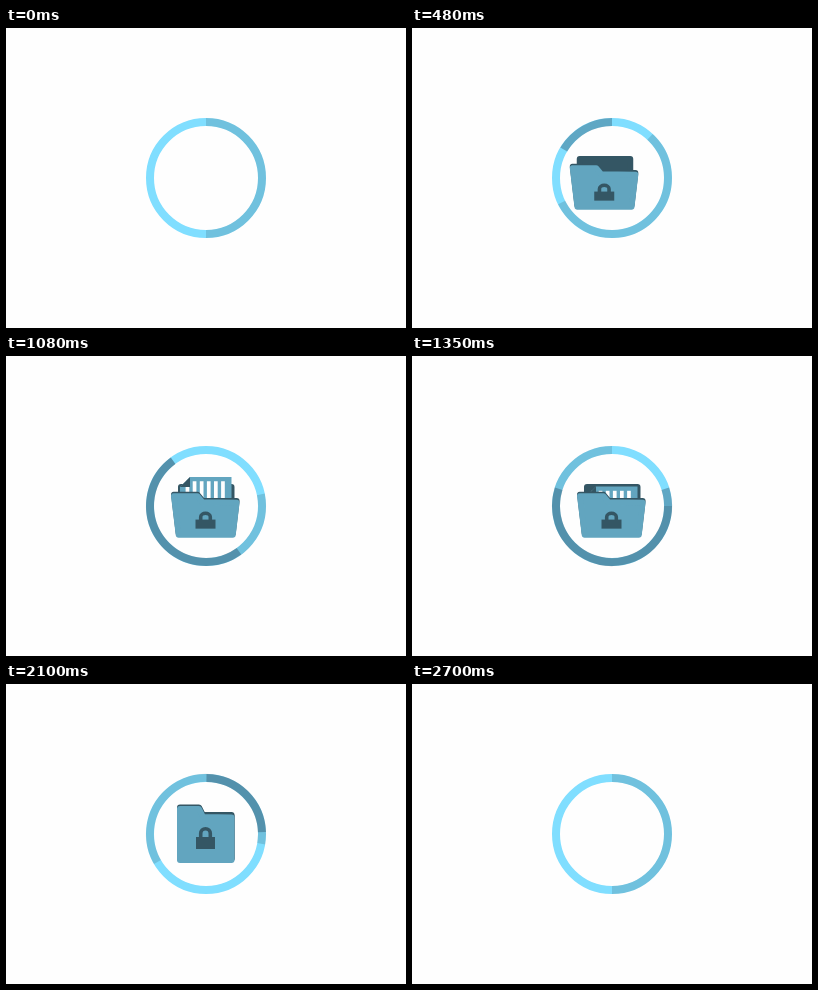
Recreate the animation shown at these times as an HTML page with a canvas. Size 400 by 300 pixels, loop 2730 ms.

```html
<!DOCTYPE html>
<html lang="en">
<head>
<meta charset="utf-8">
<title>Locked folder loader</title>
<style>
  html, body { margin: 0; width: 100%; height: 100%; overflow: hidden; background: #fefefe; }
  canvas { display: block; width: 400px; height: 300px; }
</style>
</head>
<body>
<canvas id="stage" width="400" height="300"></canvas>
<script>
const ctx = document.getElementById('stage').getContext('2d');
const LOOP = 2730, STEP = 30, STEPS = 90;
const CX = 200, CY = 150, BASE = 179;
const PAPER = '#fefefe', TEAL = '#62a5bf', DARK = '#345664';
const OPEN = 41 * Math.PI / 180;

// Progress of f from a to b, held at 0 before and 1 after.
const ramp = (f, a, b) => Math.min(1, Math.max(0, (f - a) / (b - a)));
const sineIn = u => 1 - Math.cos(u * Math.PI / 2);
const sineOut = u => Math.sin(u * Math.PI / 2);

// Ring angles in degrees; the sweep's two ends mirror each other in time.
const shadeTail = f => 60 * ramp(f, 0, .25) + 30 * ramp(f, .25, .5) + 270 * ramp(f, .5, 1);
const sweepTail = f => 72 * sineIn(ramp(f, .2, .5)) + 216 * ramp(f, .5, .8) + 72 * sineOut(ramp(f, .8, 1));
const sweepHead = f => 360 - sweepTail(1 - f);

const slide = f => 92 * (ramp(f, 0, .193) - 1 + ramp(f, .8, 1));
const tilt = f => OPEN * (1 - ramp(f, .5, .705));
const sheetTop = f => 130.5 - 86 * (1 - ramp(f, .2, .5)) ** 2;

function arc(from, to, color) {
  if (to - from < .01) return;
  const rad = d => (d - 90) * Math.PI / 180;
  ctx.beginPath();
  ctx.arc(CX, CY, 56, rad(from), rad(to));
  ctx.lineWidth = 8;
  ctx.strokeStyle = color;
  ctx.stroke();
}

function drawRing(f) {
  arc(0, 360, '#80deff');
  arc(shadeTail(f), 180 + 360 * f, 'rgba(0,0,0,.13)');
  arc(-sweepHead(f), -sweepTail(f), 'rgba(0,10,30,.26)');
}

function polygon(points, color) {
  ctx.beginPath();
  points.forEach(([x, y]) => ctx.lineTo(x, y));
  ctx.closePath();
  ctx.fillStyle = color;
  ctx.fill();
}

// Polygon grown by 3px with rounded corners.
function softShape(points, color) {
  polygon(points, color);
  ctx.strokeStyle = color;
  ctx.lineWidth = 6;
  ctx.lineJoin = 'round';
  ctx.stroke();
}

function drawSheet(top) {
  const left = 174, right = 225.5, fold = 10, bottom = top + 38.5;
  const cut = [[left + fold, top], [left, top + fold]];
  polygon([cut[0], [right, top], [right, bottom], [left, bottom], cut[1]], TEAL);
  ctx.fillStyle = PAPER;
  for (let i = 0; i < 6; i++) ctx.fillRect(179.6 + 7.1 * i, top + 4.3, 3.7, 31);
  polygon([...cut, [left + fold, top + fold]], DARK);
}

function drawLock(lean, squash, base) {
  const lockY = y => base - (BASE - y) * squash + 2.2 * lean;
  const top = lockY(153), half = 9.5 + .5 * lean;
  ctx.fillStyle = ctx.strokeStyle = DARK;
  ctx.fillRect(199.5 - half, top, 2 * half, lockY(165) - top);
  ctx.beginPath();
  ctx.moveTo(194.7, top + 1);
  ctx.ellipse(199.5, lockY(149.5), 4.8, 4.8 * squash, 0, Math.PI, 2 * Math.PI);
  ctx.lineTo(204.3, top + 1);
  ctx.lineWidth = 3.6;
  ctx.stroke();
}

// The front flap leans toward the viewer: shorter, and wider at the top.
function drawFront(angle) {
  const lean = Math.sin(angle) / Math.sin(OPEN), squash = Math.cos(angle);
  const base = BASE + 2 * lean;
  const project = ([x, y]) => {
    const h = BASE - y;
    return [CX + (x - CX) * (1 + lean * (.04 + .2 * h / 57)), base - h * squash];
  };
  const flap = [[174, 125], [193, 125], [197, 133], [225.5, 133.5], [225.5, 176], [174, 176]].map(project);
  softShape(flap.map(([x, y]) => [x, y - 1.6]), DARK);
  softShape(flap, TEAL);
  drawLock(lean, squash, base);
}

function drawFolder(f) {
  ctx.save();
  ctx.beginPath();
  ctx.arc(CX, CY, 53, 0, 2 * Math.PI);
  ctx.clip();
  ctx.translate(slide(f), 0);
  softShape([[175, 131], [225.5, 131], [225.5, 175], [175, 175]], DARK);
  if (f > .2) drawSheet(sheetTop(f));
  drawFront(tilt(f));
  ctx.restore();
}

function render() {
  const f = Math.floor(performance.now() % LOOP / STEP) / STEPS;
  ctx.fillStyle = PAPER;
  ctx.fillRect(0, 0, 400, 300);
  drawFolder(f);
  drawRing(f);
  requestAnimationFrame(render);
}
render();
</script>
</body>
</html>
```
